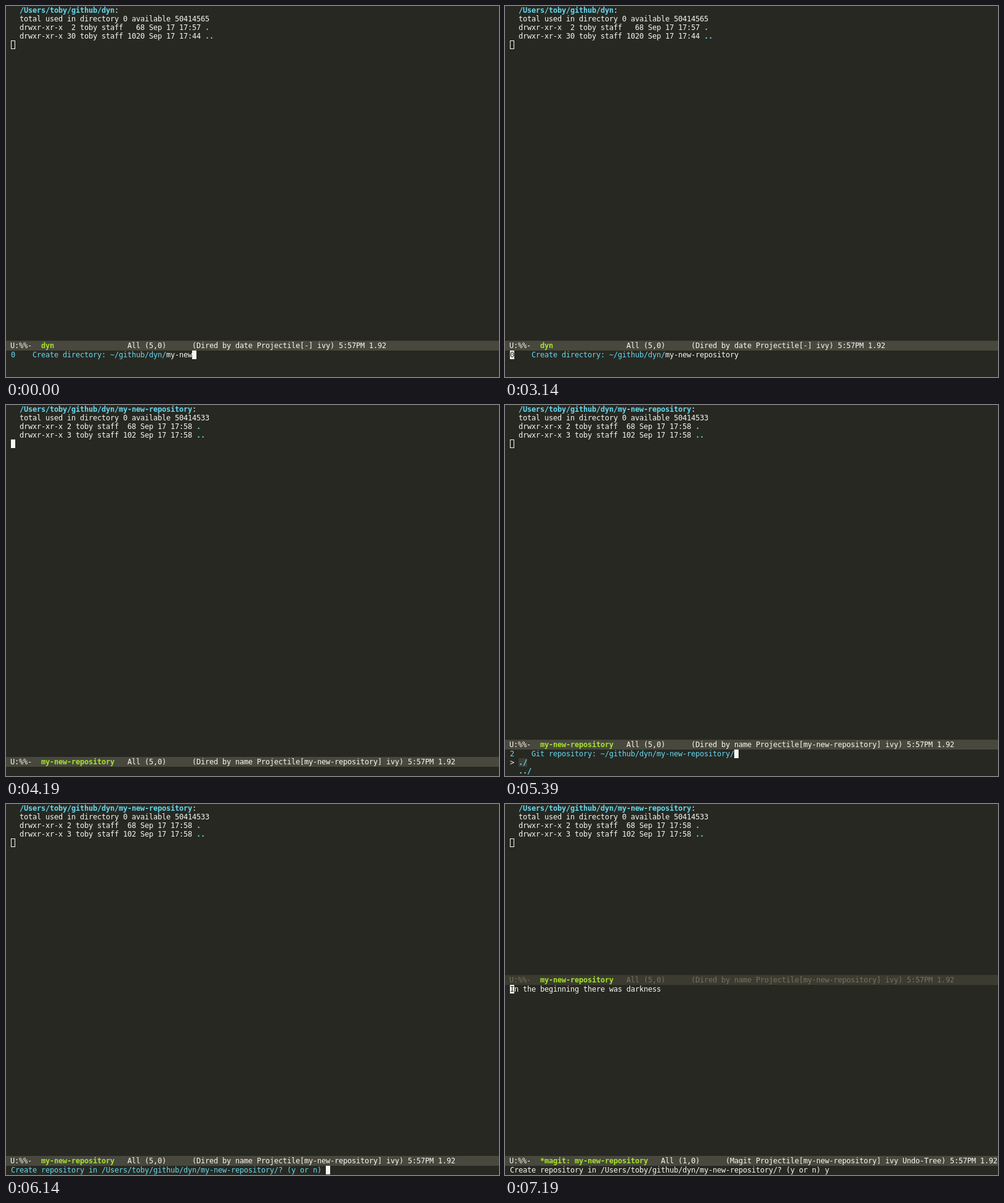
These frames come from a looping animation (800 px wide and 603 px high, 8 s). An HTML page with a canvas:

```html
<!DOCTYPE html>
<html lang="en">
<head>
<meta charset="utf-8">
<title>Create a repository</title>
<style>
html, body { margin: 0; width: 800px; height: 603px; overflow: hidden; background: #272822; }
canvas { display: block; }
</style>
</head>
<body>
<canvas id="stage" width="800" height="603"></canvas>
<script>
const ctx = document.getElementById('stage').getContext('2d');
const LOOP = 8000, COL = 7, ROW = 14, LEFT = 8;
const BG = '#272822', FG = '#f8f8f2', CYAN = '#66d9ef', GREEN = '#a6e22e', GRAY = '#75715e';
const BAR = '#49483e', BAR_DIM = '#3c3b31', MATCH = '#3c3d37';
const REPO = 'my-new-repository';
const HOME = '/Users/toby/github/dyn';

// [time, letters of the directory name typed so far]
const KEYS = [[0, 6], [140, 7], [590, 8], [740, 9], [890, 10], [1190, 12],
              [1340, 13], [2090, 14], [2390, 16], [2840, 17]];

// Puts text on the character grid and returns the x after it.
function put(str, x, y, color = FG, bold = false) {
  ctx.font = (bold ? 'bold ' : '') + '12px "DejaVu Sans Mono", monospace';
  ctx.fillStyle = color;
  for (const ch of str) {
    if (ch !== ' ') ctx.fillText(ch, x, y + 11);
    x += COL;
  }
  return x;
}

function fill(x, y, w, h, color) {
  ctx.fillStyle = color;
  ctx.fillRect(x, y, w, h);
}

function cursor(x, y, under = '') {
  fill(x, y, COL, ROW, FG);
  put(under, x, y, BG);
}

function hollowCursor(x, y) {
  ctx.strokeStyle = FG;
  ctx.lineWidth = 1;
  ctx.strokeRect(x + 0.5, y + 0.5, COL - 1, ROW - 1);
}

function modeLine(y, name, width, pos, modes, active = true) {
  const color = active ? FG : GRAY;
  fill(0, y, 800, 16, active ? BAR : BAR_DIM);
  put('U:%%-', 7, y + 1, color);
  put(name, 57, y + 1, GREEN, true);
  put(`   All ${pos}      (${modes}) 5:57PM 1.92`, 57 + width * COL, y + 1, color);
}

function listing(path, free, entries) {
  const x = LEFT + 2 * COL;
  put(':', put(path, x, 0, CYAN, true), 0);
  put('total used in directory 0 available ' + free, x, ROW);
  entries.forEach((line, i) => {
    const y = (i + 2) * ROW;
    put('..'.slice(0, i + 1), put(line, x, y), y, CYAN, true);
  });
}

function oldListing() {
  listing(HOME, '50414565', ['drwxr-xr-x  2 toby staff   68 Sep 17 17:57 ',
                             'drwxr-xr-x 30 toby staff 1020 Sep 17 17:44 ']);
}

function newListing() {
  listing(HOME + '/' + REPO, '50414533', ['drwxr-xr-x 2 toby staff  68 Sep 17 17:58 ',
                                          'drwxr-xr-x 3 toby staff 102 Sep 17 17:58 ']);
}

function oldBar(y) {
  modeLine(y, 'dyn', 17, '(5,0)', 'Dired by date Projectile[-] ivy');
}

function newBar(y, active) {
  modeLine(y, REPO, 17, '(5,0)', `Dired by name Projectile[${REPO}] ivy`, active);
}

function directoryPrompt(t) {
  const typed = KEYS.filter(k => k[0] <= t).pop()[1];
  let x = put('0    Create directory: ~/github/dyn/', LEFT, 560, CYAN);
  x = put(REPO.slice(0, typed), x, 560);
  if (t < 3140) cursor(x, 560);
  else cursor(LEFT, 560, '0');
}

function repositoryPrompt() {
  const x = put(`2    Git repository: ~/github/dyn/${REPO}/`, LEFT, 560, CYAN);
  cursor(x, 560);
  put('>', LEFT, 574);
  fill(22, 574, 2 * COL, ROW, MATCH);
  put('./', 22, 574, CYAN, true);
  put('../', 22, 588, CYAN, true);
}

function confirmPrompt(answered) {
  const text = `Create repository in ${HOME}/${REPO}/? (y or n) `;
  const x = put(text, LEFT, 588, answered ? FG : CYAN);
  if (answered) put('y', x, 588);
  else cursor(x, 588);
}

function magitWindow() {
  put('In the beginning there was darkness', LEFT, 294);
  cursor(LEFT, 294, 'I');
  modeLine(572, '*magit: ' + REPO, 25, '(1,0)', `Magit Projectile[${REPO}] ivy Undo-Tree`);
}

function draw(t) {
  fill(0, 0, 800, 603, BG);

  if (t < 4190) oldListing();
  else newListing();

  if (t >= 3290 && t < 5390) cursor(LEFT, 56);
  else hollowCursor(LEFT, 56);

  if (t < 3290) oldBar(544);
  else if (t < 4190) oldBar(572);
  else if (t < 5390) newBar(572);
  else if (t < 6140) newBar(544);
  else if (t < 7190) newBar(572);
  else newBar(278, false);

  if (t < 3290) directoryPrompt(t);
  if (t >= 5390 && t < 5990) repositoryPrompt();
  if (t >= 5990) confirmPrompt(t >= 7040);
  if (t >= 7190) magitWindow();
}

function tick() {
  draw(performance.now() % LOOP);
  requestAnimationFrame(tick);
}
tick();
</script>
</body>
</html>
```
